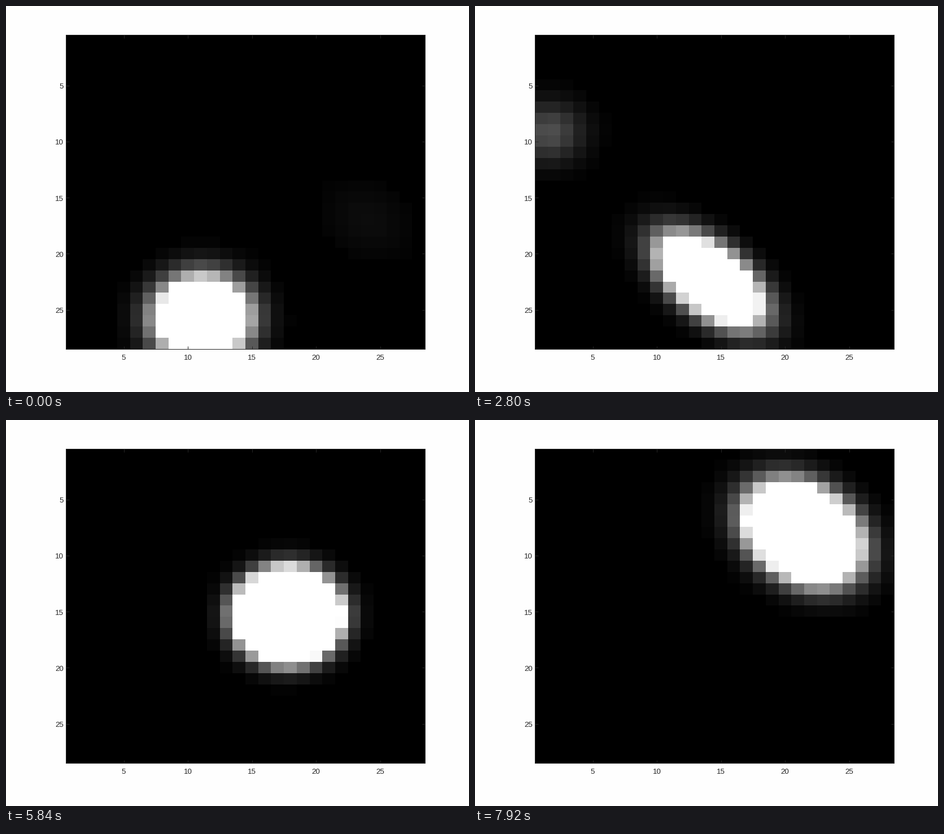
These frames come from a looping animation (820x683 px, 8 s). A matplotlib script:

```python
import numpy as np
import matplotlib.pyplot as plt
from matplotlib.animation import FuncAnimation

W, H, DPI = 820, 683, 64
LEFT, TOP, RIGHT, BOTTOM = 106.45, 51.2, 742.1, 607.3
N = 28
FRAMES, INTERVAL = 100, 80
INK = "#262626"
PX = 72 / DPI

# One blob hands over to the next in a crossfade.
HANDOVERS = [-4, 30, 84]
FADE_SPAN, FADE_DEPTH = 13, 8
RADIUS_SQ = 18

# Waypoints of each blob: frame, x, y, edge steepness, diagonal tilt.
PATHS = [
    [(0, 11.1, 25.7, .12, 0)],
    [(0, 24, 17, .09, -.2), (10, 20.9, 18, .13, 0),
     (21, 21.45, 15.9, .13, 0), (35, 14.2, 22.4, .147, -.55)],
    [(35, 1.6, 9.2, .15, 0), (45, 5, 10.5, .15, 0),
     (55, 10.6, 12.8, .235, -.14), (67, 13.2, 12.7, .2, 0),
     (73, 17.8, 15.35, .16, 0), (84, 23.2, 23.8, .135, .2)],
    [(88, 20, 6.5, .11, -.2), (99, 21.4, 8, .11, -.27)],
]
ROWS, COLS = np.mgrid[1:N + 1, 1:N + 1]


def progress(handover, frame):
    return np.clip((frame - handover) / FADE_SPAN, 0, 1)


def blob(index, frame):
    times, *values = np.transpose(PATHS[index])
    cx, cy, steep, tilt = (np.interp(frame, times, v) for v in values)
    dim = 0
    if index > 0:
        dim += FADE_DEPTH * (1 - progress(HANDOVERS[index - 1], frame)) ** 1.5
    if index < len(HANDOVERS):
        dim += FADE_DEPTH * progress(HANDOVERS[index], frame) ** 2
    dx, dy = COLS - cx, ROWS - cy
    distance_sq = dx**2 + dy**2 + 2 * tilt * dx * dy
    return np.exp(steep * (RADIUS_SQ - distance_sq) - dim)


def picture(frame):
    light = np.max([blob(i, frame) for i in range(len(PATHS))], axis=0)
    return np.where(light < .013, 0, np.minimum(light, 1))


fig = plt.figure(figsize=(W / DPI, H / DPI), dpi=DPI, facecolor="#fefefe")
ax = fig.add_axes([LEFT / W, 1 - BOTTOM / H, (RIGHT - LEFT) / W, (BOTTOM - TOP) / H])
image = ax.imshow(picture(0), cmap="gray", vmin=0, vmax=1, aspect="auto",
                  interpolation="nearest", extent=(.5, N + .5, N + .5, .5))

marks = range(5, N, 5)
ax.set_xticks(marks)
ax.set_yticks(marks)
ax.tick_params(direction="in", length=5.5 * PX, width=PX, color=INK,
               top=True, right=True, labelbottom=False, labelleft=False)
for spine in ax.spines.values():
    spine.set(color=INK, linewidth=PX)


def label(x, y, value, align):
    fig.text(x / W, 1 - y / H, str(value), ha=align, va="baseline", color=INK,
             family="Liberation Sans", size=13.33 * PX)


for mark in marks:
    share = (mark - .5) / N
    label(LEFT + share * (RIGHT - LEFT), 625.5, mark, "center")
    label(102, TOP + share * (BOTTOM - TOP) + 5.5, mark, "right")


def update(frame):
    image.set_data(picture(frame))
    return [image]


anim = FuncAnimation(fig, update, frames=FRAMES, interval=INTERVAL,
                     repeat=True, repeat_delay=0, blit=False)
plt.show()
```
